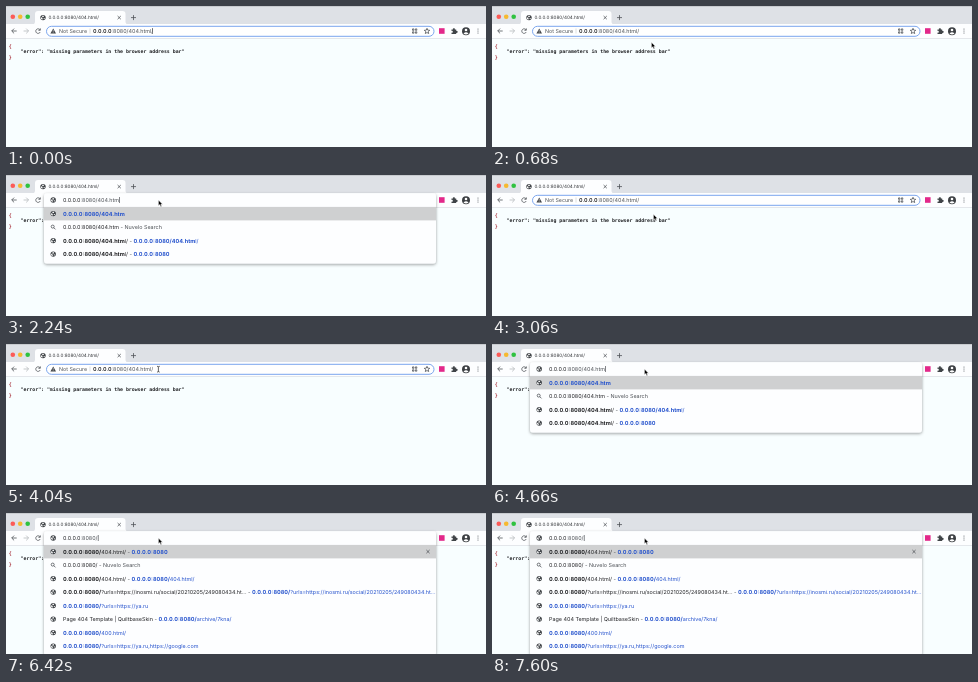
Animation of 480 by 141 pixels, one loop 8 s. Source, as an HTML page:

```html
<!DOCTYPE html>
<html lang="en">
<head>
<meta charset="utf-8">
<title>Address bar</title>
<style>
  html, body { margin: 0; width: 100%; height: 100%; overflow: hidden; background: #f8feff; }
  svg { display: block; width: 480px; height: 141px; }
  text { font: 5.42px Inter, "Open Sans", sans-serif; fill: #202124; white-space: pre; text-rendering: geometricPrecision; }
  .tab { font-size: 4.62px; fill: #303336; }
  .grey { fill: #4c5055; }
  .blue { fill: #2351cc; }
  .bold { font-weight: 700; font-size: 5.55px; }
  .host { font-weight: 600; }
  .json { font: bold 4.87px "DejaVu Sans Mono", monospace; }
  .brace { fill: #a8323c; }
  .line { fill: none; stroke: #505458; stroke-width: .8; }
  .faint { stroke: #b4b8bc; }
</style>
</head>
<body>
<svg viewBox="0 0 480 141" xmlns="http://www.w3.org/2000/svg">
  <defs>
    <filter id="shadow" x="-5%" y="-10%" width="110%" height="125%">
      <feDropShadow dx="0" dy="1.2" stdDeviation="1.4" flood-color="#000" flood-opacity=".38"/>
    </filter>
    <g id="globe">
      <circle r="2.7" fill="#404448"/>
      <path d="M-2.1-.7L-.4 .6L-.6 2.1A2.2 2.2 0 0 1-2.1-.7ZM-.3-2.1L1-1.6L.6-.5L-.7-.3L-.9-1.2ZM.5 .4L1.9 .3L1.4 1.5L.7 1.2Z" fill="#fff"/>
    </g>
    <g id="lens" class="line">
      <circle cx="-.5" cy="-.5" r="1.5"/><path d="M.6 .6L2.3 2.3"/>
    </g>
    <path id="cross" class="line" d="M-1.6-1.6L1.6 1.6M1.6-1.6L-1.6 1.6"/>
  </defs>

  <rect width="480" height="141" fill="#f8feff"/>
  <rect width="480" height="19" fill="#dee1e6"/>
  <rect width="480" height=".8" fill="#c3c6ca"/>
  <circle cx="6.8" cy="10.8" r="2.3" fill="#fc5b57"/>
  <circle cx="14.2" cy="10.8" r="2.3" fill="#f6b92f"/>
  <circle cx="21.7" cy="10.8" r="2.3" fill="#2fc23f"/>
  <path d="M26 18.5Q29 18.5 29 15.5V8Q29 5 32 5H116.5Q119.5 5 119.5 8V15.5Q119.5 18.5 122.5 18.5Z" fill="#fdfeff"/>
  <rect y="18" width="480" height="14" fill="#fdfeff"/>
  <rect y="32" width="480" height=".7" fill="#dcdfe2"/>
  <use href="#globe" x="37" y="11.6"/>
  <text class="tab" x="42.5" y="13.2">0.0.0.0:8080/404.html/</text>
  <use href="#cross" x="113.2" y="11.6"/>
  <path class="line" d="M125 11.6H130M127.5 9.1V14.1"/>

  <path class="line" d="M10.7 25H5.8M8.1 22.6L5.7 25L8.1 27.4"/>
  <path class="line faint" d="M17.6 25H22.5M20.2 22.6L22.6 25L20.2 27.4"/>
  <path class="line" d="M34.1 24A2.3 2.3 0 1 0 34.2 26M34.3 22.4V24.3H32.4"/>
  <rect x="40.5" y="20.3" width="387.5" height="10" rx="5" fill="#fff" stroke="#7ba6ee" stroke-width="1"/>
  <path d="M47.2 22.4L50 27.4H44.4Z" fill="#404448"/>
  <path d="M47.2 24.1V25.7M47.2 26.2V26.8" stroke="#fff" stroke-width=".6"/>
  <text class="grey" x="53" y="26.9" style="font-size:5.3px">Not Secure</text>
  <path d="M84 22.5V27.5" stroke="#c6c9cc" stroke-width=".6"/>
  <text x="87" y="26.9"><tspan class="host">0.0.0.0</tspan><tspan class="grey">:8080/404.html/</tspan></text>
  <path class="line" d="M406.5 22.9h1.4v1.4h-1.4zM409.4 22.9h1.4v1.4h-1.4zM406.5 25.8h1.4v1.4h-1.4zM409.4 25.8h1.4v1.4h-1.4z"/>
  <path id="star" class="line"/>
  <rect x="433" y="22.2" width="5.6" height="5.6" fill="#e3288a"/>
  <path d="M445.5 23.6H447A1 1 0 1 1 448.8 23.6H450.2V25A1 1 0 1 1 450.2 26.7V28H445.5V26.6A.9 .9 0 1 0 445.5 25Z" fill="#404448"/>
  <circle cx="460" cy="25.2" r="4" fill="#3c3f43"/>
  <circle cx="460" cy="24" r="1.3" fill="#fff"/>
  <path d="M457.5 27.5Q460 25 462.5 27.5Q460 29.3 457.5 27.5Z" fill="#fff"/>
  <path d="M472 23v.01M472 25v.01M472 27v.01" stroke="#55595e" stroke-width="1.1" stroke-linecap="round"/>

  <text class="json brace" x="2.7" y="42.2">{</text>
  <text class="json" x="14.6" y="47.3">"error": "missing parameters in the browser address bar"</text>
  <text class="json brace" x="2.7" y="53.1">}</text>

  <g id="popup">
    <rect id="panel" x="38" y="18.3" width="392" rx="3" fill="#fdfeff" filter="url(#shadow)"/>
    <rect x="38" y="31.9" width="392" height="13.5" fill="#cfd0d1"/>
    <use href="#globe" x="47.2" y="25"/>
    <text x="57" y="26.9">0.0.0.0<tspan class="grey" id="typed"></tspan></text>
    <g id="rows"></g>
  </g>
  <rect id="caret" y="22" width=".7" height="6" fill="#4c5055"/>
  <path id="arrow" d="M0 0V5.8L1.4 4.6L2.3 6.7L3.3 6.3L2.4 4.3H4.2Z" fill="#000" stroke="#fff" stroke-width=".5"/>
  <path id="beam" d="M-1.3-2.9Q0-2.9 0-2.1V2.1Q0 2.9-1.3 2.9M1.3-2.9Q0-2.9 0-2.1M0 2.1Q0 2.9 1.3 2.9" fill="none" stroke="#222" stroke-width=".7"/>
</svg>
<script>
const LOOP = 8000, REPEAT = 2420, OPEN = 2020;
const HOST = '0.0.0.0:8080', BASE = HOST + '/';
const PAGE = BASE + '404.html/';
const LEFT = 57, ROW_Y = 38.6, PITCH = 13.5;
// Time of each deletion and what is left after the slash
const EDITS = [[2020, '404.html'], [2240, '404.htm'], [2700, '404.ht'], [2940, '404.h'],
  [3140, '404.'], [3320, '404'], [3540, '40'], [3700, '4'], [4000, '']];

const $ = id => document.getElementById(id);
const show = (el, on) => el.setAttribute('visibility', on ? 'visible' : 'hidden');
const place = (el, x, y) => el.setAttribute('transform', `translate(${x.toFixed(2)} ${y.toFixed(2)})`);
const span = (text, cls) => `<tspan class="${cls}">${text}</tspan>`;

// Bold the part of an address that matches the typed text
function address(url, query, cls = '') {
  const n = url.startsWith(BASE) || url === HOST ? Math.min(url.length, query.length) : 0;
  return span(url.slice(0, n), cls + ' bold') + span(url.slice(n), cls);
}

function suggestions(query) {
  const link = url => address(url, query, 'blue');
  const pair = (title, url) => address(title, query) + span(' - ', 'grey') + link(url);
  const search = query + span(' - Nuvelo Search', 'grey');
  if (query !== BASE) {
    const list = [link(query), search, pair(PAGE, PAGE), pair(PAGE, HOST)];
    if (query.length < BASE.length + 3) list.push(link(BASE + '400.html/'));
    return list;
  }
  const long = BASE + '?urls=https://inosmi.ru/social/20210205/249080434.ht...';
  return [
    pair(PAGE, HOST), search, pair(PAGE, PAGE), pair(long, long),
    link(BASE + '?urls=https://ya.ru'),
    pair('Page 404 Template | QuiltbaseSkin', BASE + 'archive/7kna/'),
    link(BASE + '400.html/'),
    link(BASE + '?urls=https://ya.ru,https://google.com')
  ];
}

let current = null, caretX = 0;
function fill(path) {
  if (path === current) return;
  current = path;
  const list = suggestions(BASE + path);
  $('typed').textContent = ':8080/' + path;
  caretX = LEFT + $('typed').parentNode.getComputedTextLength() + .3;
  $('panel').setAttribute('height', 16.2 + list.length * PITCH);
  $('rows').innerHTML = list.map((row, i) => {
    const y = ROW_Y + i * PITCH;
    return `<use href="#${i === 1 ? 'lens' : 'globe'}" x="47.2" y="${y}"/>` +
      `<text x="${LEFT}" y="${y + 1.9}">${row}</text>`;
  }).join('') + (path ? '' : `<use href="#cross" x="422" y="${ROW_Y}"/>`);
}

// Fast at first, settling on the address bar
function pointer(p) {
  const k = Math.min(1, Math.max(0, (p - 260) / 800));
  const e = 1 - (1 - k) ** 2.2, r = 1 - e;
  const bend = (a, b, c) => r * r * a + 2 * r * e * b + e * e * c;
  return [bend(209, 168, 152.4), bend(100, 52, 25)];
}

function draw(t) {
  const p = t < REPEAT ? t : t - REPEAT;
  const open = p >= OPEN;
  show($('popup'), open);
  if (open) {
    fill(EDITS.filter(e => e[0] <= p).pop()[1]);
    const step = Math.min(4, Math.floor((p - OPEN) / 20) + 1);
    $('popup').setAttribute('opacity', step / 4);
  }
  const blink = open ? p >= 4580 && p < 5180 : (p >= 540 && p < 1060) || p >= 1620;
  show($('caret'), !blink);
  $('caret').setAttribute('x', open ? caretX : 146.1);

  const [x, y] = pointer(p);
  const inBar = !open && y < 30;
  show($('arrow'), p >= 260 && !inBar);
  show($('beam'), inBar);
  place($('arrow'), x, y);
  place($('beam'), x + (p < 1460 ? .3 : 0), y + .2);
}

$('star').setAttribute('d', 'M' + Array.from({ length: 10 }, (_, i) => {
  const a = i * Math.PI / 5, r = i % 2 ? 1.3 : 2.9;
  return (421 + r * Math.sin(a)).toFixed(2) + ' ' + (25.2 - r * Math.cos(a)).toFixed(2);
}).join('L') + 'Z');

const start = performance.now();
function tick() {
  draw((performance.now() - start) % LOOP);
  requestAnimationFrame(tick);
}
tick();
</script>
</body>
</html>
```
